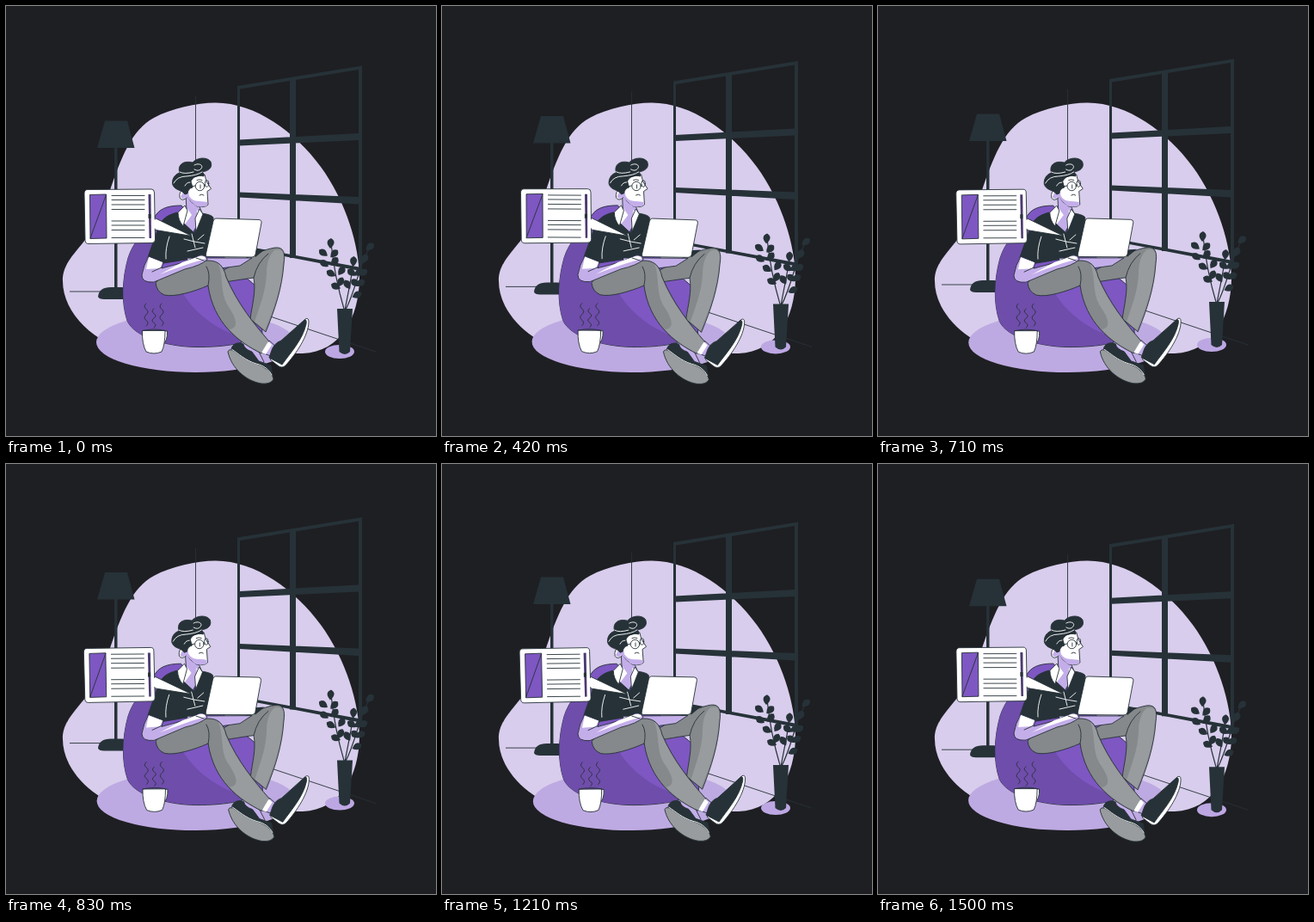
An HTML page that plays this animation: 500 px wide and 500 px high, repeating every 1.54 s.

```html
<!DOCTYPE html>
<html lang="en">
<head>
<meta charset="utf-8">
<title>Reading at home</title>
<style>
  html, body { margin: 0; width: 100%; height: 100%; overflow: hidden; background: #1e1f23; }
  svg { display: block; width: 100vw; height: 100vh; }
  .slate, .ink { fill: #263238; }
  .wire { fill: none; stroke: #263238; }
  .thin { fill: none; stroke: #263238; stroke-width: .9; stroke-linecap: round; stroke-linejoin: round; }
  .edge { stroke: #263238; stroke-width: .9; stroke-linejoin: round; }
  .white { fill: #fff; }
  .lilac { fill: #c4aeea; }
  .violet { fill: #7e57c2; }
  .deep { fill: #6f4dab; }
  .grey { fill: #989c9e; }
  .dim { fill: #85898b; }
  .shine { fill: none; stroke: #fff; stroke-width: .9; stroke-linecap: round; }
</style>
</head>
<body>
<svg viewBox="0 0 500 500">
  <rect width="500" height="500" fill="#1e1f23"/>
  <path fill="#d8cdec" d="M243 112.500C289 112 336 146 366 187C395 227 411 278 411 318C410 362 390 402 345 404H150C103 393 66 357 66 320C66 287 101 280 120 217C134 176 146 144 172 130C192 119 222 112.500 243 112.500Z"/>

  <g id="room">
    <path class="wire" stroke-width=".9" d="M220.500 105V332H74M220.500 332L430 402"/>
    <g id="window" class="slate">
      <path d="M269 93L414 69.500V308.500L269 280.500ZM272 96.500V278L410 303.500V74Z" fill-rule="evenodd"/>
      <path d="M330 85L337 84V293H330ZM271 155.500L410 148V156L271 162.500ZM271 216.500L410 222V230.500L271 222.500Z"/>
    </g>
    <path class="slate" d="M115 133.500H141L149.500 165H106ZM126 165H129.500V328H126ZM107 338Q108 327 122 327H135Q145 328 146 338Q144 341 137 341H114Q108 341 107 338Z"/>
    <ellipse cx="388" cy="402" rx="17" ry="8" fill="#bda7e3"/>
    <g id="plant" class="slate">
      <path class="wire" stroke-width="1.200" d="M393.500 354Q382 315 378 276M394 354C399 327 403 310 404 297M394.500 354C408 328 411 298 423 281"/>
      <path d="M385 352H403L400 402Q394 408 387.500 402Z"/>
    </g>
  </g>

  <g id="reader">
    <ellipse cx="220.500" cy="391" rx="115.500" ry="35" fill="#beaae2"/>

    <g id="beanbag">
      <path class="violet edge" d="M204 232C187 232 177 236 172 247C160 264 148 274 142 293C135 318 134 345 141 366C149 385 188 396 220 396.500C258 397 284 391 298 382L296 330L260 300Z"/>
      <path class="deep" d="M172 248C160 264 148 274 142 293C135 318 134 345 141 366C149 385 188 396 220 396C250 396 272 393 287 388C255 383 222 362 205 333L172 322L160 305L172 275Z"/>
    </g>

    <g id="farLeg">
      <path class="dim edge" d="M231 320C255 306 291 284 313 281C323 280 325 287 323 300C321 328 313 352 302 379L284 364C286 348 291 332 288 316C272 318 250 322 238 323Z"/>
      <path class="grey" d="M312 284C323 281 324 288 322 300C320 328 312 351 301 377L289 367C297 344 302 330 303 312C303 299 306 290 312 284Z"/>
      <path class="thin" d="M288 316Q292 298 305 288"/>
    </g>

    <g id="farShoe">
      <path class="lilac edge" d="M274 390L293 400L300 414L296 420C287 412 278 405 270 402Z"/>
      <path class="grey edge" d="M258 402Q259 399 263 400C270 404 278 412 291 416C302 419 310 427 311 434Q308 440 297 439C279 436 262 421 258 402Z"/>
      <path class="ink edge" d="M262 399C263 393 270 390 276 393Q277 399 286 402L294 413L308 418L310 430C303 420 297 418 291 416C278 412 270 404 262 399Z"/>
      <path class="shine" d="M263 399.500C270 404 278 412 291 416C300 418 306 423 309 429"/>
    </g>

    <g id="torso">
      <path class="lilac edge" d="M209 219L210 238L200 243L216 266L229 243L224 231Z"/>
      <path class="white" d="M211 236L200 242L207 255L216 243ZM222 237L229 243L222 258Z"/>
      <path class="ink edge" d="M199 240C188 243 181 247 177 258L165 292L183 299L190 298L234 291L241 262V246Q240 243 228 241L219 264L206 252Z"/>
      <path class="white edge" d="M200 240L208 232L211 238L206 256Q200 249 200 240ZM225 236L229 242L221 262L220 247Z"/>
      <path class="shine" d="M190 268Q185 282 186 294M207 271L219 274L231 276M216 265L220 281M230 266L223 272M211 285L229 281"/>
    </g>

    <path class="lilac edge" d="M211 293H286L272 302L235 307L209 302Z"/>
    <path class="ink" d="M285 284L301 283L290 292Z"/>

    <g id="nearLeg">
      <path class="dim edge" d="M174 322C180 313 211 298 235 296C247 296 253 302 256 315C269 346 288 369 306 390L297 404C270 391 241 368 235 325C219 332 196 339 184 336Q175 332 174 322Z"/>
      <path class="grey" d="M247 300Q253 304 255 315C268 346 287 369 305 390L297 403C285 397 270 388 260 376C273 374 266 360 257 347C249 333 253 314 247 300Z"/>
      <path class="thin" d="M235 325Q238 311 233 303"/>
    </g>

    <g id="nearShoe">
      <path class="lilac edge" d="M306 389L315 397L308 407L297 403Q303 398 306 389Z"/>
      <path class="white" d="M305 390L309 394L302 405L297 403Z"/>
      <path class="white edge" d="M348 364Q352 362 352 367C352 383 337 405 325 418Q321 422 316 418L307 411Z"/>
      <path class="ink edge" d="M308 403Q311 392 320 389L347 365Q350 364 349 370C345 388 331 403 321 417L306 409Z"/>
    </g>

    <g id="arm">
      <path class="lilac edge" d="M166 291L183 298L181 305L207 298L225 290Q233 289 234 295Q226 302 208 306L172 321Q158 322 158 313Q160 301 166 291Z"/>
      <path class="white" d="M166 292L182 298L179 305L163 306ZM179 312L205 298L225 291Q231 290 232 294L215 299L192 307Z"/>
      <path class="thin" d="M181 304L170 309M221 293L230 296"/>
    </g>

    <path class="white edge" d="M244 247L294 248.500Q297.500 249 297 252L290 289Q289 292 286 292L234 291.500Q231.500 291 232.500 288L241 250Q242 247 244 247Z"/>

    <g id="head">
      <path class="white edge" d="M209 201L231 196L233 204L238.500 212.500L234 215.500L235 231Q231 235 222 233Q214 228 211 222Q205 228 202 223Q201 215 206 214Z"/>
      <path class="lilac" d="M206 216L212 216L213 221C218 229 225 226 234 228V232Q226 235 220 232L210 222Q205 226 203 222Z"/>
      <path class="ink edge" d="M208 219C204 213 196 215 193.500 207C193 199 198 195 202 194C199 186 205 179 217 182C222 176 234 175 238 181C241 189 234 192 228 193Q231 195 230 198C223 196 217 199 215 204L217 211Q212 212 211 218Z"/>
      <path class="shine" d="M195 206Q199 198 210 198Q222 197 228 193M202 193Q207 196 218 193M219 185C224 182 230 185 227 189Q224 193 219 190"/>
      <path class="shine" d="M208 209Q210 205 214 205"/>
      <g class="thin">
        <circle cx="225.500" cy="209.500" r="5.200"/>
        <ellipse cx="233.500" cy="206.500" rx="2.200" ry="3.800"/>
        <path d="M220 209L211 211M230.500 208H231.500M226 208V212M222 202.500Q225 201 228 202.500M225 220Q228 218 230 220"/>
      </g>
    </g>

    <g id="tablet">
      <path class="white edge" d="M171 245.500L216 267.500L171 260Z"/>
      <path class="white edge" d="M95 213.500L169 213Q172.500 213 172.500 217L173.500 271Q173.500 275.500 169 275.500L96 276.500Q92 276.500 92 272L91 218Q91 213.500 95 213.500Z"/>
      <path class="white" d="M170 247L180 252L180 260L170 258Z"/>
      <path class="violet edge" d="M97.500 219.500L116.500 219L117 270L98 270.500Z"/>
      <path class="thin" d="M98 270L116.500 219.500"/>
      <path class="thin" id="lines"/>
      <path fill="#4b3a70" d="M165.500 219H168.500L169 270H166.500Z"/>
      <rect class="ink" x="165.500" y="242" width="3" height="5"/>
    </g>

    <g id="cup">
      <path class="white edge" d="M184 378H187.500Q188 390 182 394Z"/>
      <path class="white edge" d="M158.500 377.500H185Q185 394 181 402Q172 406 163 402Q158 393 158.500 377.500Z"/>
      <path class="thin" d="M158.500 377.500Q172 374.500 185 377.500"/>
      <path class="thin" id="steam"/>
    </g>
  </g>
</svg>
<script>
const LOOP = 1540, LEAD = 70;
const byId = id => document.getElementById(id);

byId("lines").setAttribute("d",
  [220.5, 225.5, 231, 236.5, 250, 255, 260.5, 269.5].map(y => `M123 ${y}H161`).join(""));

// Each wisp: left, top, height of one bend.
byId("steam").setAttribute("d", [[163, 346, 6.5], [172, 352, 5.5], [181, 346, 6.5]]
  .map(([x, y, h]) => `M${x} ${y}q-4 ${h / 2} 0 ${h}t0 ${h}t0 ${h}t0 ${h}`).join(""));

// Each leaf: centre x, centre y, tilt from upright.
const leaves = [
  [377.5, 276, 5], [369, 287, -55], [381.5, 288, 45], [370, 299.5, -55], [382, 297, 40],
  [378, 311, -60], [390, 308, 35], [383.5, 326, -65], [404, 297, 5], [402, 310, -55],
  [410, 310, 60], [423, 280, 50], [417, 294, 25], [415, 310, 60], [406, 322, -50],
  [412, 322, 65], [397, 324, -30], [408, 336, 65], [389, 321, 25]
];
byId("plant").insertAdjacentHTML("beforeend", leaves.map(([x, y, tilt]) =>
  `<path d="M0 6Q-8 -2 0 -6Q8 -2 0 6Z" transform="translate(${x} ${y}) rotate(${tilt})"/>`).join(""));

function draw() {
  const phase = (performance.now() % LOOP + LEAD) / LOOP * 2 * Math.PI;
  const lift = 4.1 * Math.cos(phase) - 3.9;
  const tilt = 0.5 * Math.sin(phase) - 0.14;
  byId("room").setAttribute("transform", `translate(0 ${lift})`);
  byId("reader").setAttribute("transform", `rotate(${tilt} 230 310)`);
  requestAnimationFrame(draw);
}
draw();
</script>
</body>
</html>
```
